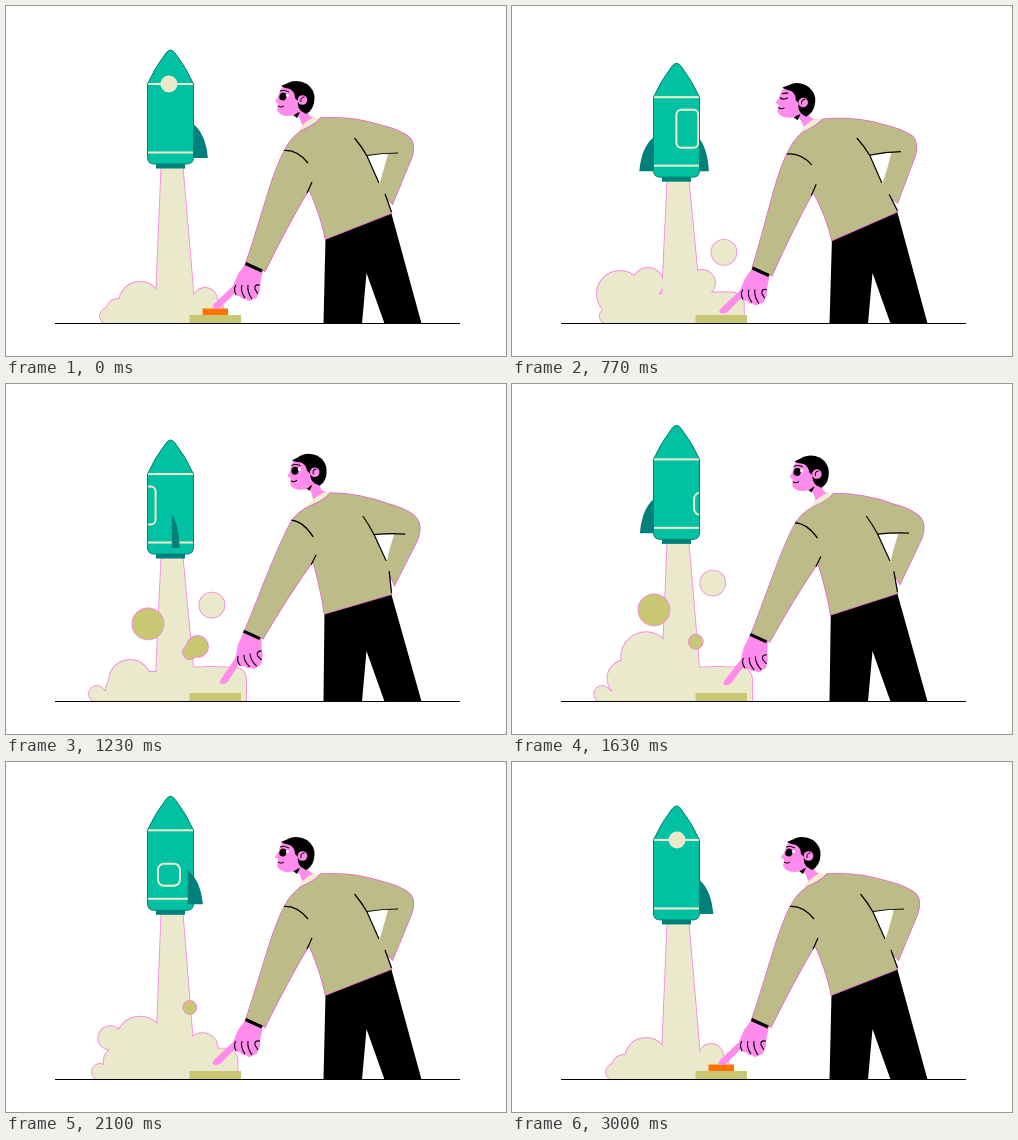
An HTML page with a canvas for the animation above (3.03 s loop, 500 by 350 pixels).

```html
<!DOCTYPE html>
<html lang="en">
<head>
<meta charset="utf-8">
<title>Lift-off</title>
<style>
html, body { margin: 0; width: 100%; height: 100%; overflow: hidden; background: #fff; }
canvas { display: block; width: 500px; height: 350px; }
</style>
</head>
<body>
<canvas id="stage" width="500" height="350"></canvas>
<script>
const ctx = document.getElementById('stage').getContext('2d');
const LOOP = 3030;
const TEAL = '#00c2a2', DARK = '#00807a', CREAM = '#ebe9cc', TRIM = '#efecd2', OLIVE = '#c9c772';
const PINK = '#ff8cec', EDGE = '#f48be0', KNIT = '#bdbc89', BLACK = '#000';
const { PI, sin, cos, abs, min, max } = Math;
const rad = a => a * PI / 180;

// Signed time since a moment of the loop, the short way round.
const since = (t, moment) => (t - moment + 1.5 * LOOP) % LOOP - LOOP / 2;
// Smooth hill of height 1 around a moment, zero beyond the given reach.
const bump = (t, moment, reach) => {
  const d = abs(t - moment) / reach;
  return d < 1 ? cos(d * PI / 2) ** 2 : 0;
};

function fill(path, color) { ctx.fillStyle = color; ctx.fill(path); }
function stroke(path, color, w) { ctx.strokeStyle = color; ctx.lineWidth = w; ctx.stroke(path); }
function disc([x, y, r]) {
  const p = new Path2D();
  if (r > 0.2) p.arc(x, y, r, 0, 7);
  return p;
}
function box(x, y, w, h, r) {
  const p = new Path2D();
  p.roundRect(x, y, w, h, r);
  return p;
}
function rect(x, y, w, h, color) {
  ctx.fillStyle = color;
  ctx.fillRect(x, y, w, h);
}

// ---- Motion ----
function bob(t) {
  const a = 2 * PI * t / LOOP;
  return .9 * (2 - cos(a) - cos(2 * a)) + 10.2 * sin(a) - 4.5 * sin(2 * a);
}
const lean = t => 1.15 * bump(t, 1360, 640) - .5 * bump(t, 680, 560);

// ---- Smoke ----
// A lobe is a circle [x, y, r] plus swells [moment, reach, dx, dy, dr].
function lobe(t, circle, ...swells) {
  return circle.map((v, i) =>
    swells.reduce((sum, s) => sum + s[i + 2] * bump(t, s[0], s[1]), v));
}
// A free puff passes (x, y) at mid, drifts steadily, and grows and shrinks at its ends.
function puff(t, mid, life, x, y, r, vx, vy) {
  const d = t - mid;
  return [x + vx * d, y + vy * d, r * max(0, min(1, 3 * (1 - abs(d) / life)))];
}
function smoke(t, dy) {
  const toe = 96 + 6 * cos(2 * PI * t / LOOP);
  const spread = bump(t, 1430, 1550);
  const jet = new Path2D(`M155.5 ${160 + dy}H176.5L187.5 288V316H150L150.5 280Z`);
  const cloud = [
    jet,
    box(toe, 307, 80, 20, 0),
    box(116, 288, 50, 40, 12),
    box(165, 292 - 9 * spread, 52 + 24 * spread, 50, 12),
    ...[
      [toe, 310, 8],
      lobe(t, [112, 305, 12], [770, 460, -4, -17, 11], [1800, 520, 2, -14, 8]),
      lobe(t, [134, 297, 21], [770, 460, 2, -20, -6], [1230, 400, -10, 0, 0], [1830, 600, 0, -32, 5]),
      lobe(t, [199, 294, 12], [770, 430, -9, -17, 1], [1430, 600, 8, 12, 11], [2420, 500, -9, -26, 11.5]),
      puff(t, 1150, 760, 207, 225.5, 12.5, -.013, -.055),
      puff(t, 2300, 480, 103.5, 268.5, 11.7, -.0025, -.0375)
    ].map(disc)
  ];
  const specks = [
    puff(t, 1430, 500, 142, 233, 15.5, 0, -.035),
    puff(t, 1230, 300, 191.5, 262.5, 10.5, 0, -.04),
    puff(t, 1660, 640, 183.8, 257, 7, 0, -.026)
  ].map(disc);

  ctx.save();
  ctx.beginPath();
  ctx.rect(0, 0, 500, 317.5);
  ctx.clip();
  for (const [group, color] of [[cloud, CREAM], [specks, OLIVE]]) {
    group.forEach(s => stroke(s, EDGE, 1.8));
    group.forEach(s => fill(s, color));
  }
  ctx.restore();
}

// ---- Rocket ----
function fin(a) {
  const xi = 164.5 + 23 * sin(rad(a - 5)), xo = 164.5 + 37.5 * sin(rad(a + 6));
  const p = new Path2D();
  p.moveTo(xi, 118);
  p.quadraticCurveTo(xi + .85 * (xo - xi), 128, xo, 152);
  p.lineTo(xi, 152);
  p.closePath();
  fill(p, DARK);
}
function rocket(t, dy) {
  const fins = [385, 1267, 2334].map(m => -.23 * since(t, m)).filter(a => abs(a) < 142);
  const front = a => abs(a) < 80;
  // Markings slide right to left across the hull.
  const slide = (mid, speed) => 164.5 - speed * since(t, mid);

  ctx.save();
  ctx.translate(0, dy);
  fins.filter(a => !front(a)).forEach(fin);
  rect(150, 157, 29, 5.5, DARK);

  const hull = new Path2D('M160 47Q164.5 41 169 47Q180.5 62 187.5 78V151Q187.5 158 181 158H148Q141.5 158 141.5 151V78Q148.5 62 160 47Z');
  fill(hull, TEAL);
  ctx.save();
  ctx.clip(hull);
  rect(140, 77, 50, 2, TRIM);
  rect(140, 145.5, 50, 2, TRIM);
  fill(disc([slide(3008, .07), 78, 8.5]), CREAM);
  stroke(box(slide(907, .08) - 11, 90.5, 22, 38, 5), TRIM, 2);
  stroke(box(slide(2077, .064) - 11, 111.5, 22, 22, 6), TRIM, 2);
  ctx.restore();
  stroke(hull, '#067f70', 1);
  fins.filter(front).forEach(fin);
  ctx.restore();
}

// ---- Man ----
// Builds a path from command letters and [x, y, dx, dy] points; the lean u scales dx, dy.
function leaning(u, ...parts) {
  return new Path2D(parts.map(s => typeof s === 'string' ? s
    : `${s[0] + u * (s[2] || 0)} ${s[1] + u * (s[3] || 0)}`).join(' '));
}
function hand(u) {
  ctx.save();
  ctx.translate(248 - 2 * u, 261 - 10 * u);
  ctx.rotate(rad(-12 * max(0, u)));
  ctx.translate(-248, -261);
  fill(new Path2D('M240 257L232 268L227 280L208 298Q204 303 210 303Q214 303 217 299L229 287Q230 291 234 290Q236 294 240 293Q243 297 247 293Q252 293 252 288Q255 285 254 279L257 264Z'), PINK);
  stroke(new Path2D('M230 279Q227 283 230 289M236 279Q234 285 239 292M242 279Q241 286 246 293M254 279Q248 278 249 283L252 288'), BLACK, 1.1);
  ctx.restore();
}
function head(u, shut) {
  ctx.save();
  ctx.translate(296 + 11.8 * u, 94 - 5.5 * u);
  ctx.rotate(-.1 * u);
  ctx.translate(-296, -94);
  fill(new Path2D('M277 79Q273 85 272 91L269 95Q270 97 272 97L271 104Q274 110 282 110Q288 110 291 107L300 104V84L288 77Z'), PINK);
  fill(new Path2D('M275 80Q280 78 284 76Q292 73 301 78Q309 84 308.5 93Q308 104 300 108L295 105Q291 101 292 95L289 92Q289 86 284 83Q278 82 275 80Z'), BLACK);
  fill(disc([296.5, 94, 4.8]), PINK);
  stroke(new Path2D('M298.5 91Q294 91 295 96'), BLACK, 1);
  if (shut) {
    stroke(new Path2D('M273 90Q276 93 281 90M275 86L281 85'), BLACK, 1.2);
  } else {
    const eye = new Path2D();
    eye.ellipse(277, 90.5, 3.6, 4, .3, 0, 7);
    fill(eye, BLACK);
    fill(disc([281.5, 89.5, 1.6]), '#fff');
    stroke(new Path2D('M274 85Q278 83 283 86'), BLACK, 1);
  }
  stroke(new Path2D('M272 100Q275 102.5 278 100'), BLACK, 1);
  ctx.restore();
}
function man(t) {
  const u = lean(t);
  const shape = (...p) => leaning(u, ...p);

  // trousers
  fill(shape('M', [319.5, 232, -1, -3], 'L', [385, 206, 0, 3],
    'L415.5 317.5H378.5L360.5 267L356 317.5H317.5Z'), BLACK);

  // neck and collar
  fill(shape('M', [288, 105, 12, -5], 'L', [300, 104, 12, -5], 'L', [304, 110, 11, -4],
    'L', [314, 114, 10, -3], 'L', [298, 124, 10, -3], 'L', [294, 113, 11, -4], 'Z'), PINK);
  fill(shape('M', [287, 109, 12, -5], 'L', [296, 102, 12, -5], 'L', [291, 112, 12, -5], 'Z'), BLACK);
  fill(shape('M', [292, 126, 9, -4], 'Q', [294, 119, 10, -3], [307, 111.5, 10, -3],
    'L', [318, 112, 9, -3], 'L', [300, 127, 9, -3], 'Z'), '#f1edd3');
  head(u, t > 560 && t < 900);
  hand(u);

  const knit = shape('M', [319.5, 233, -1, -3],
    'Q', [315, 210, 0, -4], [303, 183, 4, -6],
    'Q', [281, 220, 1, -8], [259, 265, -2, -10],
    'L', [240, 257, -1, -10],
    'C', [257, 207, 2, -9], [266, 167, 6, -7], [279, 143.5, 7, -7],
    'Q', [285, 132, 8, -5], [295, 125, 9, -3],
    'Q', [309, 119, 10, -3], [315, 112, 9, -3],
    'Q', [346, 110, 7, -1], [374, 119, 8, 1],
    'Q', [395, 124, 9, 2], [404, 132, 7, 3],
    'Q', [410, 139, 6, 3], [405.5, 152, 6, 3],
    'L', [386.5, 198, 2, 3], 'L', [380, 191, 3, -2],
    'L', [385.5, 207, 0, 3], 'Z');
  stroke(knit, '#e85fcb', 1.5);
  fill(knit, KNIT);

  // opening between arm and body
  fill(shape('M', [361, 149.5, 7, 1], 'L', [382, 147.5, 6, 3], 'Q', [378, 163, 5, 1],
    [373.5, 178, 7, 0], 'Z'), '#fff');
  stroke(shape('M', [348.5, 132, 8, 0], 'Q', [356, 141, 7, 0], [361, 150, 7, 1],
    'L', [373, 177, 7, 0],
    'M', [361, 149.5, 7, 1], 'Q', [376, 147, 7, 2], [392, 147, 7, 3],
    'M', [379, 188, 4, -1], 'L', [385.5, 206, 0, 3],
    'M', [278, 144.5, 7, -8], 'Q', [291, 143.5, 6, -6], [302, 157, 5, -4],
    'M', [306, 176, 4, -5], 'L', [301, 187, 4, -6]), BLACK, 1.2);
  stroke(shape('M', [239.5, 257.5, -2, -10], 'L', [256, 265, -2, -10]), BLACK, 3.2);
}

// ---- Button ----
function button(t) {
  const h = 6.5 * max(0, min(1, 1.5 - abs(since(t, 0)) / 300));
  rect(196.5, 309 - h, 25.5, h, '#ff7300');
  rect(183.5, 309, 51.5, 8.5, OLIVE);
}

function draw(t) {
  const dy = bob(t);
  rect(0, 0, 500, 350, '#fff');
  smoke(t, dy);
  rocket(t, dy);
  button(t);
  man(t);
  rect(49, 317, 405, 1, BLACK);
}

const start = performance.now();
function tick() {
  draw((performance.now() - start) % LOOP);
  requestAnimationFrame(tick);
}
tick();
</script>
</body>
</html>
```
